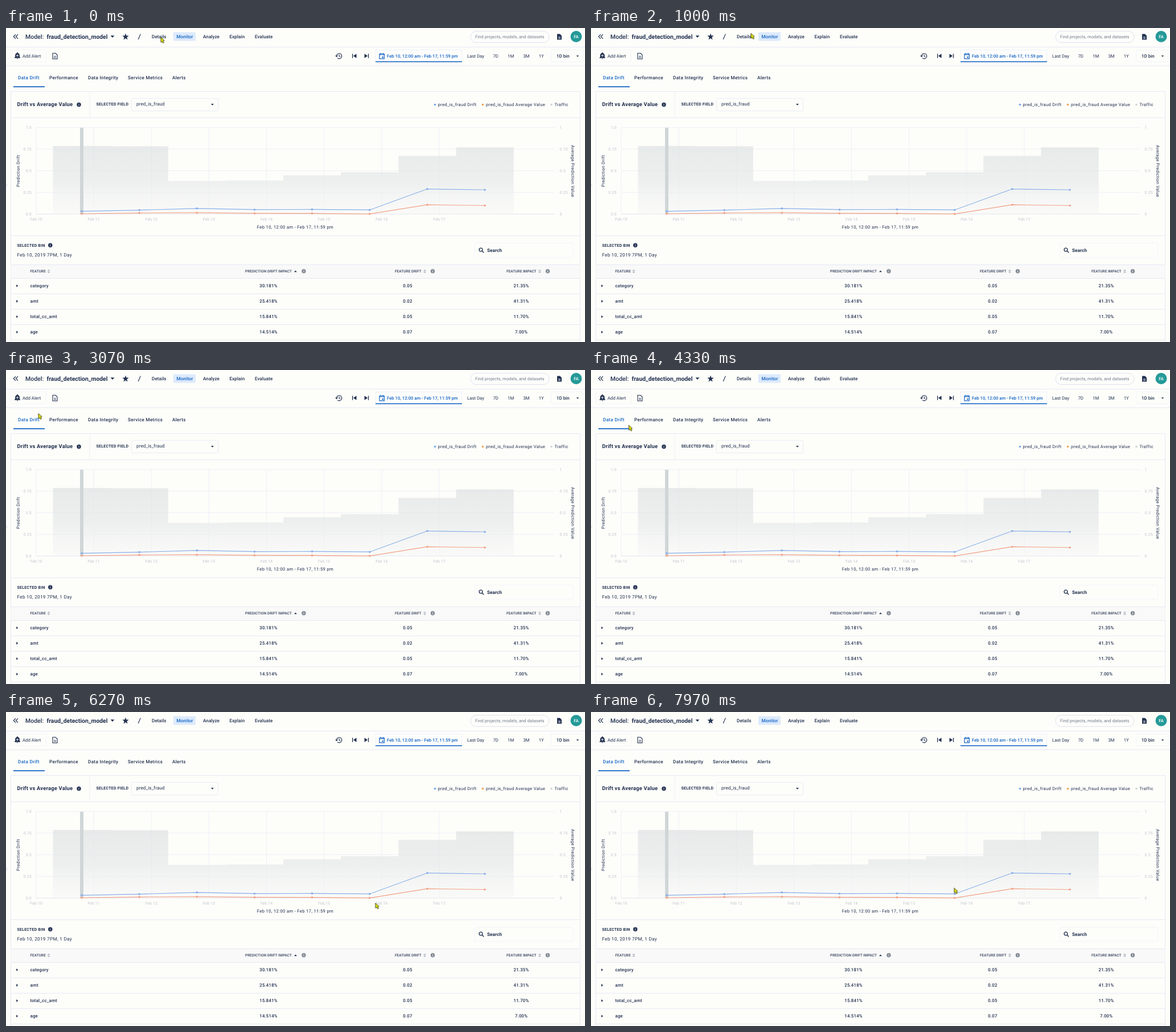
These frames come from a looping animation (1017x551 px, 8000 ms). An HTML page:

```html
<!DOCTYPE html>
<html lang="en">
<head>
<meta charset="utf-8">
<title>Model monitor</title>
<style>
  html, body { margin: 0; width: 100%; height: 100%; overflow: hidden; background: #fdfdfa; }
  svg { display: block; width: 100vw; height: 100vh; font-family: Roboto, sans-serif; }
  text { white-space: pre; text-rendering: geometricPrecision; }
  #cursor { animation: roam 8000ms linear infinite; }
  @keyframes roam {
    0% { transform: translate(271.5px, 16px); }
    6% { transform: translate(270px, 10px); }
    12.5% { transform: translate(280.5px, 9px); animation-timing-function: ease-in-out; }
    27.875% { transform: translate(34.5px, 86px); }
    33% { transform: translate(42px, 77px); }
    38.375% { transform: translate(56.5px, 76px); }
    46% { transform: translate(67px, 83px); }
    54.125% { transform: translate(66px, 96.5px); animation-timing-function: ease-in; }
    63.375% { transform: translate(83px, 118px); }
    65.375% { transform: translate(83px, 118px); animation-timing-function: ease-in-out; }
    68.75% { transform: translate(296px, 372px); }
    71.625% { transform: translate(296px, 372px); animation-timing-function: ease-in-out; }
    78.375% { transform: translate(648.5px, 335px); }
    92.5% { transform: translate(646px, 328px); }
    99.625%, 100% { transform: translate(637.5px, 308.5px); }
  }
</style>
</head>
<body>
<svg id="stage" viewBox="0 0 1017 551"></svg>
<script>
const INK = '#22314f', BLUE = '#1565c4', RULE = '#e6e9f5', FAINT = '#eff0f6', TICK = '#c2c6ce';
const out = [];
const add = markup => out.push(markup);

function text(x, y, str, { size = 8.2, weight = 500, fill = INK, anchor = 'start', gap = 0, turn = 0 } = {}) {
  const spin = turn ? ` transform="rotate(${turn} ${x} ${y})"` : '';
  add(`<text x="${x}" y="${y}" font-size="${size}" font-weight="${weight}" fill="${fill}" text-anchor="${anchor}" letter-spacing="${gap}"${spin}>${str}</text>`);
}
const rect = (x, y, w, h, fill, stroke = 'none', r = 0) =>
  add(`<rect x="${x}" y="${y}" width="${w}" height="${h}" rx="${r}" fill="${fill}" stroke="${stroke}"/>`);
const stroke = (d, color = INK, width = 1) =>
  add(`<path d="${d}" fill="none" stroke="${color}" stroke-width="${width}"/>`);
const shape = (d, fill = INK) => add(`<path d="${d}" fill="${fill}"/>`);
const dot = (x, y, r, fill) => add(`<circle cx="${x}" cy="${y}" r="${r}" fill="${fill}"/>`);
const hline = (y, x1 = 0, x2 = 1017, color = RULE) => stroke(`M${x1} ${y}H${x2}`, color);
const caret = (x, y, r = 2.5) => shape(`M${x - r} ${y - r / 2}h${2 * r}l${-r} ${r * 1.1}z`);

function info(x, y, fill = INK) {
  dot(x, y, 3.7, fill);
  stroke(`M${x} ${y - .4}v2.4M${x} ${y - 2.1}v1`, '#fff', .9);
}
function sorter(x, y) {
  stroke(`M${x - 1.8} ${y - 1}l1.8 -2 1.8 2zM${x - 1.8} ${y + 1}l1.8 2 1.8 -2z`, '#7d8798', .6);
}
function page(x, y, filled) {
  const d = `M${x - 4} ${y - 5}h5l3 3v7h-8z`;
  filled ? shape(d) : stroke(d, INK, 1.1);
  stroke(`M${x - 2} ${y + .5}h4M${x - 2} ${y + 2.7}h4`, filled ? '#fff' : INK, .9);
}

function header() {
  hline(33.5);
  stroke('M17 11.2l-3.7 3.8 3.7 3.8M21 11.2l-3.7 3.8 3.7 3.8', INK, 1.2);
  text(34, 18.7, 'Model:', { size: 10.5 });
  text(71.5, 18.7, 'fraud_detection_model', { size: 10.4, weight: 700 });
  caret(187, 15, 3.4);
  const star = Array.from({ length: 10 }, (_, i) => {
    const r = i % 2 ? 2.5 : 6, a = Math.PI * (i / 5 - .5);
    return `${(210 + r * Math.cos(a)).toFixed(1)} ${(15.5 + r * Math.sin(a)).toFixed(1)}`;
  });
  shape(`M${star.join('L')}z`);
  stroke('M236.3 10.5L232.2 20', INK, 1.1);
  rect(294, 7.5, 39, 15, '#dceafc', 'none', 1);
  [[256, 'Details'], [299.5, 'Monitor'], [346, 'Analyze'], [392.5, 'Explain'], [437, 'Evaluate']]
    .forEach(([x, s]) => text(x, 18, s, { fill: s === 'Monitor' ? BLUE : INK, gap: .04 }));
  rect(816, 5.5, 138, 20, '#fdfdfb', '#dfe3ee', 10);
  text(824, 18, 'Find projects, models, and datasets', { size: 7.6, weight: 400, fill: '#727b8c', gap: .06 });
  page(972, 15.5, true);
  dot(1001.5, 15, 10, '#249a98');
  text(1001.5, 17.8, 'FA', { size: 7.6, fill: '#fff', anchor: 'middle' });
}

function toolbar() {
  hline(66);
  rect(8.5, 38.5, 62, 21, 'none', '#f4f5f9', 2);
  shape('M15 52.8v-1l1.1-1.2v-3.2q.2-2.8 2.8-3.4v-.6q1.1-1.2 2.2 0v.6q2.6.6 2.8 3.4v3.2l1.1 1.2v1zM18.6 53.6h2.8q-1.4 2-2.8 0z');
  stroke('M20 46.2v4.4M17.8 48.4h4.4', '#fff', .9);
  text(29, 51.8, 'Add Alert', { size: 7.8, weight: 400 });
  page(86, 49.3, false);
  stroke('M580.6 49.4a4.6 4.6 0 1 1 1.4 3.2M578.8 48.4l1.8 2 1.9 -2M585.2 46.5v3l2.2 1.4', INK, 1.1);
  shape('M608 45.2h1.3v7.6h-1.3zM615.6 45.2v7.6l-5.6-3.8zM635.9 45.2h1.3v7.6h-1.3zM629.6 45.2v7.6l5.6-3.8z');
  rect(649.5, 38.5, 151, 20, '#fdfdfc', '#edf0f8');
  stroke('M649 59.3H801', BLUE, 1.5);
  stroke('M656 45.5h8.4v8.4h-8.4zM656 47h8.4M658 43.7v2M662.4 43.7v2', BLUE, 1.2);
  rect(660.4, 50, 2.3, 2.3, BLUE);
  text(669, 51.8, 'Feb 10, 12:00 am - Feb 17, 11:59 pm', { size: 7.7, fill: BLUE });
  [[825, 'Last Day'], [860.2, '7D'], [886.8, '1M'], [914, '3M'], [940.2, '1Y']]
    .forEach(([x, s]) => text(x, 51.8, s, { size: 7.75, weight: 400, anchor: 'middle' }));
  rect(957.5, 38.5, 56, 21, 'none', '#f2f4f9', 2);
  text(967, 51.8, '1D bin', { size: 8 });
  caret(1004, 49.4, 2.2);
}

function tabs() {
  [[21, 'Data Drift'], [76, 'Performance'], [144, 'Data Integrity'], [214, 'Service Metrics'], [292, 'Alerts']]
    .forEach(([x, s], i) => text(x, 89.5, s, { fill: i ? INK : BLUE, gap: .29 }));
  stroke('M13 103.2H68', BLUE, 1.7);
  rect(8.5, 111.5, 1000, 445, 'none', RULE);
}

function chartHead() {
  hline(157.5, 8, 1009);
  stroke('M147 112V157', FAINT);
  text(19.5, 137.3, 'Drift vs Average Value', { size: 9.4, weight: 700, gap: .2 });
  info(128, 134.5);
  text(158.5, 136.3, 'SELECTED FIELD', { size: 7, weight: 700, gap: .25 });
  rect(220.5, 123.5, 152, 22, 'none', '#e9ecf4', 2);
  text(229, 136.1, 'pred_is_fraud', { size: 8.2, weight: 400, gap: .06 });
  caret(362.5, 134.2, 2.5);
  [[753.5, 758.5, 'pred_is_fraud Drift', '#75a6f0'], [837.5, 843, 'pred_is_fraud Average Value', '#f5a04a'], [958, 963.5, 'Traffic', '#d0d5d3']]
    .forEach(([cx, x, s, color]) => {
      dot(cx, 134.5, 1.8, color);
      text(x, 137, s, { size: 7.6, weight: 400, gap: .33 });
    });
}

function chart() {
  const dayX = i => 53 + 101.15 * i;
  const ticks = ['1.0', '0.75', '0.5', '0.25', '0.0'];
  const tick = { size: 7, weight: 400, fill: TICK, gap: .22 };
  ticks.forEach((s, i) => {
    const y = 174.5 + 38 * i;
    hline(y, 53, 964, i === 4 ? '#e2e5ee' : FAINT);
    text(45, y + 2, s, { ...tick, anchor: 'end' });
    text(972.5, y + 2, s.replace(/\.0$/, ''), tick);
  });
  for (let i = 0; i < 8; i++) stroke(`M${dayX(i)} 174.5V327`, FAINT);

  add('<linearGradient id="fade" gradientUnits="userSpaceOnUse" x1="0" y1="207" x2="0" y2="327"><stop stop-color="#dce1e1" stop-opacity=".66"/><stop offset=".5" stop-color="#e2e6e7" stop-opacity=".6"/><stop offset="1" stop-color="#f5f6f6" stop-opacity=".4"/></linearGradient>');
  const steps = [207, 207.5, 268.5, 267.5, 258.5, 253, 224.5, 209.5];
  const area = steps.map((y, i) => `V${y}H${(82.5 + 101.15 * (i + 1)).toFixed(1)}`).join('');
  shape(`M82.5 326.5${area}V326.5z`, 'url(#fade)');
  rect(130, 175, 6, 152, '#d0d6d7');

  const series = (ys, color) => {
    const points = ys.map((y, i) => [+(133 + 101.15 * i).toFixed(1), y]);
    stroke('M' + points.map(p => p.join(' ')).join('L'), color, 1.2);
    points.forEach(([x, y]) => dot(x, y, 1.8, color));
  };
  series([326, 324.6, 324.2, 325.2, 325.4, 326.3, 310.2, 311.5], '#f3a184');
  series([321.6, 319.6, 316.6, 318.7, 318.4, 319.2, 282.5, 284], '#89afe9');

  for (let i = 0; i < 8; i++) text(dayX(i), 337.5, `Feb ${10 + i}`, { ...tick, gap: .05, anchor: 'middle' });
  text(508, 351.8, 'Feb 10, 12:00 am - Feb 17, 11:59 pm', { size: 7.7, weight: 400, gap: .32, anchor: 'middle' });
  text(23.5, 251, 'Prediction Drift', { size: 7.6, weight: 400, gap: .33, anchor: 'middle', turn: -90 });
  text(993, 251, 'Average Prediction Value', { size: 7.6, weight: 400, gap: .31, anchor: 'middle', turn: 90 });
  stroke('M0 272.5l2 3 -2 3', '#d5d9e6', .8);
}

function table() {
  hline(364.5, 8, 1009);
  text(19.5, 383.5, 'SELECTED BIN', { size: 7, weight: 700, gap: .22 });
  info(77.8, 381.3);
  text(19.5, 400.7, 'Feb 10, 2019 7PM, 1 Day', { weight: 400, gap: .3 });
  rect(823.5, 377.5, 172, 25, 'none', '#f4f5f9', 2);
  add(`<circle cx="834" cy="389" r="2.9" fill="none" stroke="${INK}" stroke-width="1.3"/>`);
  stroke('M836.2 391.2l3 3', INK, 1.5);
  text(845, 393, 'Search', { weight: 700, gap: .08 });

  rect(8.5, 416, 1000, 23, '#f9f9f9');
  hline(415.5, 8, 1009);
  hline(439.5, 8, 1009);
  const head = { size: 6.4, weight: 700, fill: '#4d586e', gap: .06 };
  text(42.5, 429.2, 'FEATURE', head);
  sorter(75, 427);
  text(420, 429.2, 'PREDICTION DRIFT IMPACT', head);
  shape('M506 428.2l2.5-2.7 2.5 2.7z');
  text(683, 429.2, 'FEATURE DRIFT', head);
  sorter(735.5, 427);
  text(879, 429.2, 'FEATURE IMPACT', head);
  sorter(937.5, 427);
  [523, 749.5, 951.5].forEach(x => info(x, 426.7, '#858c95'));

  [['category', '30.181%', '0.05', '21.35%'],
   ['amt', '25.418%', '0.02', '41.31%'],
   ['total_cc_amt', '15.841%', '0.05', '11.70%'],
   ['age', '14.514%', '0.07', '7.00%']].forEach(([name, ...values], i) => {
    const y = 452.2 + 27.1 * i;
    shape(`M18.2 ${y - 2.2}l3 2.4 -3 2.4z`);
    text(42.5, y + 2.8, name, { size: 7.9, gap: .18 });
    values.forEach((v, k) => text([461, 705.5, 905][k], y + 2.8, v, { size: 7.9, gap: .15, anchor: 'middle' }));
    hline(Math.round(y + 13.6) + .5, 8, 1009);
  });
}

[header, toolbar, tabs, chartHead, chart, table].forEach(draw => draw());
add('<path id="cursor" d="M.3 .3L6.6 5.9 4.4 6.4 5.9 9.6 4.1 10.4 2.6 7.5 .7 9.1z" fill="#e2e200" stroke="#3a3e1c" stroke-width=".9" stroke-linejoin="round"/>');
document.getElementById('stage').innerHTML = out.join('');
</script>
</body>
</html>
```
